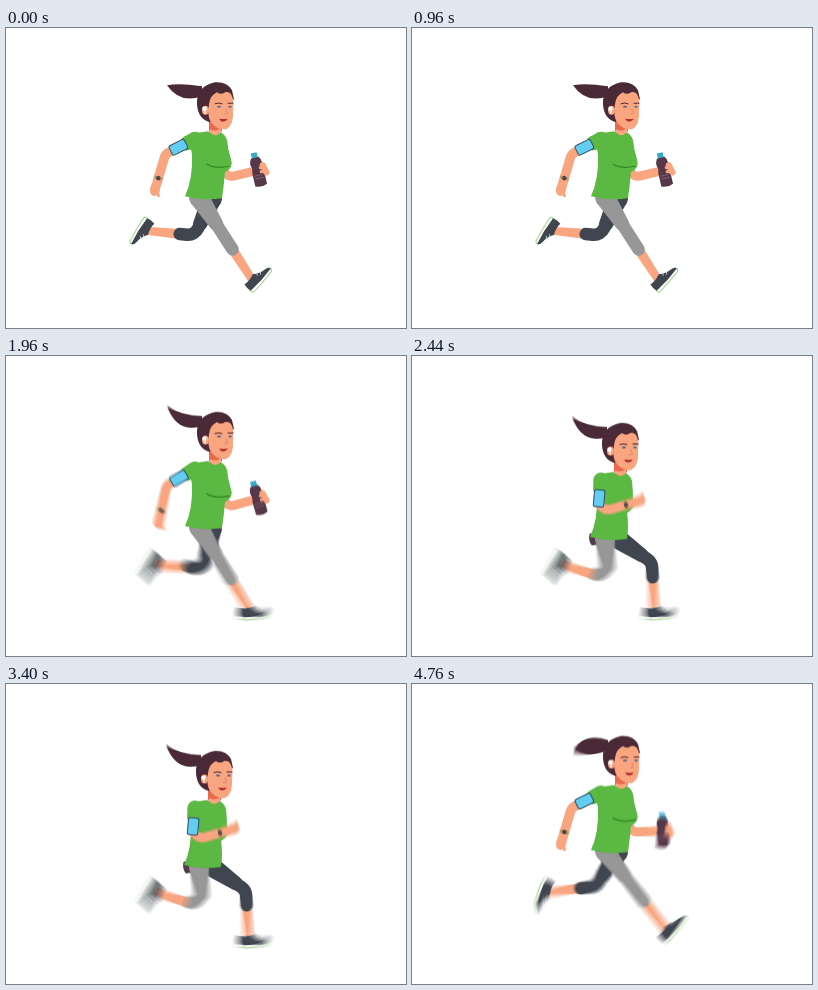
An HTML page with a canvas that plays this animation: 400x300 px, repeating every 4800 ms.

```html
<!DOCTYPE html>
<html lang="en">
<head>
<meta charset="utf-8">
<title>Runner</title>
<style>
  html, body { margin: 0; width: 100%; height: 100%; overflow: hidden; background: #fff; }
  canvas { display: block; width: 400px; height: 300px; }
</style>
</head>
<body>
<canvas id="stage" width="400" height="300"></canvas>
<script>
const STEP = 40, CYCLE = 24, SAMPLES = 12, SHUTTER = 0.9;
const THIGH = 41, SHANK = 46, RAD = Math.PI / 180;
const SKIN = '#f9a57f', HAIR = '#4b2a38', GREEN = '#5bb842', NAVY = '#3f4650';
const GREY = '#979797', PLUM = '#55384a', BLUE = '#62cdf0';

const stage = document.getElementById('stage').getContext('2d');
const layer = document.createElement('canvas');
layer.width = 400;
layer.height = 300;
const c = layer.getContext('2d');

// Both feet follow this loop half a cycle apart: step, ankle x, ankle y, foot angle.
const FOOT_PATH = [
  [0, 245, 250, -50], [1, 243, 252, -4], [7, 147, 252, 42], [10, 137, 218, 88],
  [12, 143, 203, 120], [14, 165, 218, 102], [19, 236, 232, 20], [22, 258, 239, -45]
];

// Cyclic Hermite curve through FOOT_PATH.
function footAt(phase) {
  const n = FOOT_PATH.length, t = (phase % CYCLE + CYCLE) % CYCLE;
  const key = i => {
    const turn = Math.floor(i / n), [step, ...rest] = FOOT_PATH[i - turn * n];
    return [step + turn * CYCLE, ...rest];
  };
  const i = FOOT_PATH.filter(k => k[0] <= t).length - 1;
  const [p, a, b, q] = [i - 1, i, i + 1, i + 2].map(key);
  const span = b[0] - a[0], u = (t - a[0]) / span, v = 1 - u;
  return [1, 2, 3].map(j => {
    const slopeA = (b[j] - p[j]) / (b[0] - p[0]) * span;
    const slopeB = (q[j] - a[j]) / (q[0] - a[0]) * span;
    return v * v * ((1 + 2 * u) * a[j] + u * slopeA) + u * u * ((1 + 2 * v) * b[j] - v * slopeB);
  });
}

// Cosine that peaks at the given step; two beats make one per stride.
const wave = (phase, peak, beats = 1) => Math.cos((phase - peak) * beats * 2 * Math.PI / CYCLE);
const bob = phase => 0.8 + 5.5 * wave(phase, 2, 2) + 5.5 * wave(phase, 13);

const mix = (a, b, u) => [a[0] + (b[0] - a[0]) * u, a[1] + (b[1] - a[1]) * u];
const angle = (a, b) => Math.atan2(b[1] - a[1], b[0] - a[0]);
const distance = (a, b) => Math.hypot(b[0] - a[0], b[1] - a[1]);
// Swing is measured forward from hanging straight down, in degrees.
const reach = ([x, y], length, swing) => [x + length * Math.sin(swing * RAD), y + length * Math.cos(swing * RAD)];

function fill(color, d) {
  c.fillStyle = color;
  c.fill(new Path2D(d));
}
function line(color, width, d) {
  c.strokeStyle = color;
  c.lineWidth = width;
  c.lineCap = 'round';
  c.stroke(new Path2D(d));
}
function oval(color, x, y, rx, ry = rx) {
  c.fillStyle = color;
  c.beginPath();
  c.ellipse(x, y, rx, ry, 0, 0, 2 * Math.PI);
  c.fill();
}
function at([x, y], turn, draw) {
  c.save();
  c.translate(x, y);
  c.rotate(turn);
  draw();
  c.restore();
}
function limb(color, a, b, wa, wb) {
  const length = distance(a, b);
  at(a, angle(a, b), () => {
    fill(color, `M0 ${-wa / 2}L${length} ${-wb / 2}V${wb / 2}L0 ${wa / 2}Z`);
    oval(color, 0, 0, wa / 2);
    oval(color, length, 0, wb / 2);
  });
}
function bend(color, a, joint, b, width, radius) {
  c.beginPath();
  c.moveTo(...a);
  c.arcTo(...joint, ...b, radius);
  c.lineTo(...b);
  c.strokeStyle = color;
  c.lineWidth = width;
  c.lineCap = 'round';
  c.stroke();
}

// The knee bends forward; a leg at full reach is straight.
function kneeOf(hip, ankle) {
  const d = distance(hip, ankle);
  if (d >= THIGH + SHANK) return mix(hip, ankle, THIGH / (THIGH + SHANK));
  const lift = Math.acos((THIGH ** 2 + d ** 2 - SHANK ** 2) / (2 * THIGH * d));
  const turn = angle(hip, ankle) - lift;
  return [hip[0] + THIGH * Math.cos(turn), hip[1] + THIGH * Math.sin(turn)];
}
function shoe(ankle, degrees) {
  at(ankle, degrees * RAD, () => {
    fill('#a5d68f', 'M-11 7L-10 11.5Q4 12.5 18 12Q22 11 20 7Z');
    fill('#fff', 'M-10 6L-9 10.5Q4 11.5 18 11Q20 10 19 7Z');
    fill(NAVY, 'M-9 -1Q-4 1 4 -1Q9 4 15 5Q20 6 20 9Q5 10 -10 8Q-11 4 -9 -1Z');
    line('#d5dadd', 0.8, 'M6 3L8 1M9 5L11 3');
  });
}
function leg(color, hip, [x, y, turn]) {
  const ankle = [x, y], knee = kneeOf(hip, ankle), cuff = mix(knee, ankle, 0.33);
  limb(SKIN, cuff, ankle, 10, 8);
  shoe(ankle, turn);
  limb(color, hip, mix(hip, knee, 0.7), 20, 14);
  bend(color, hip, knee, cuff, 12.5, 11);
}

function drawFarArm(phase, y) {
  const swing = wave(phase, 0.8), fold = ((1 + swing) / 2) ** 3;
  const lower = 15 + 91 * fold;
  const shoulder = [206 - 3 * swing, 118 + y];
  const elbow = reach(shoulder, 38, -2 + 32 * swing);
  const hand = reach(elbow, 29 + 5 * swing, lower);
  bend(SKIN, shoulder, elbow, hand, 9, 8);
  at(hand, (95 - 1.05 * lower) * RAD, () => {
    oval(SKIN, 1, 0, 5, 6);
    c.translate(-3, 0);
    fill('#38a9c8', 'M-3 -18H3V-12H-3Z');
    fill(PLUM, 'M-4 -13H4Q6 -10 6 -7L5 -3L6 2V15Q0 18 -6 15V2L-5 -3L-6 -7Q-6 -10 -4 -13Z');
    line('#80606f', 1, 'M-4 5H4M-4 8H4');
    limb(SKIN, [6, -4], [8, 4], 6, 6);
    line(SKIN, 3, 'M3 -2H7M3 2H7');
  });
}
function drawNearArm(phase, y) {
  const swing = wave(phase, 23.5), back = ((1 + swing) / 2) ** 2;
  const shoulder = [189, 113 + y];
  const elbow = reach(shoulder, 33, -5 - 59 * back);
  const hand = reach(elbow, 40 - 3 * swing, 47 - 64 * swing);
  bend(SKIN, shoulder, elbow, hand, 9.5, 9);
  limb(GREEN, shoulder, mix(shoulder, elbow, 0.28), 15, 14);
  at(mix(shoulder, elbow, 0.56), angle(shoulder, elbow), () => {
    c.beginPath();
    c.roundRect(-8.5, -5, 17, 10.5, 2);
    c.fillStyle = BLUE;
    c.fill();
    c.strokeStyle = '#345064';
    c.lineWidth = 1;
    c.stroke();
  });
  at(mix(elbow, hand, 0.68), angle(elbow, hand), () => {
    fill('#c99a55', 'M-1.5 -4.5H1.5V4.5H-1.5Z');
    oval('#4a4550', 0, 0, 2.3);
  });
  at(hand, angle(elbow, hand), () => {
    oval(SKIN, 0, 0, 6.5, 5);
    line(SKIN, 3, 'M0 -2L5 -5');
  });
}

function drawTorso(twist) {
  const bust = 227 - 3 * twist;
  fill(GREEN, `M187 108Q195 106 203 105Q208 109 213 105Q220 107 222 114Q223 124 ${bust - 1} 133
    Q${bust + 2} 141 ${bust - 7} 146Q219 158 217 172Q199 175 180 170Q188 153 187 128L184 113Z`);
  c.globalAlpha = 1 - twist;
  line('#37882b', 1.2, 'M202 138Q211 143 224 140');
  c.globalAlpha = 1;
}
function drawHead(phase) {
  const flick = wave(phase, 2, 2), tip = `162 ${71.5 - 25 * flick}`;
  fill(HAIR, `M${tip}Q${172 + 5 * flick} ${52 + 9 * flick} 197 60V70Q${179 - 8 * flick} 78 ${tip}Z`);
  fill('#e9694c', 'M204 92H217V105Q211 110 204 105Z');
  fill(SKIN, 'M205 103Q211 106 216 102V106Q210 112 205 106Z');
  fill(HAIR, 'M210 56Q222 55 227 64L229 73L214 78L205 96Q193 93 192 78Q191 60 210 56Z');
  fill(SKIN, 'M204 78Q205 69 212 66Q216 69 220 66Q225 65 227 70Q229 74 228 84Q229 99 221 103Q212 104 206 96Q202 90 204 78Z');
  oval(SKIN, 200.5, 84, 3.5, 4.5);
  oval('#fff', 199.5, 82.5, 2.2);
  line('#fff', 1.2, 'M200 83V87');
  line(HAIR, 1, 'M210 77.5Q214 76 217 77.5M223 77L228 77');
  oval('#536e91', 214, 80.5, 2, 1.1);
  oval('#536e91', 225, 80.5, 1.7, 1.1);
  line('#e98b68', 1, 'M221 83L222.5 87L219.5 88');
  fill('#b72f35', 'M214 92.5Q218 93 223 92.5Q221 95.5 218 95.5Q215 95 214 92.5Z');
}

function drawRunner(phase) {
  const y = bob(phase), twist = ((1 - wave(phase, 1)) / 2) ** 2;
  c.fillStyle = '#fff';
  c.fillRect(0, 0, 400, 300);
  drawFarArm(phase, y);
  leg(NAVY, [206, 172 + y], footAt(phase + CYCLE / 2));
  leg(GREY, [193, 171 + y], footAt(phase));
  at([-1 - twist, y], 0, () => {
    drawTorso(twist);
    drawHead(phase);
  });
  drawNearArm(phase, y);
}

// Averages several moments of one step into motion blur; each cycle opens crisp.
function render(step) {
  const count = step === 0 ? 1 : SAMPLES;
  for (let i = 0; i < count; i++) {
    drawRunner(step + ((i + 0.5) / count - 0.5) * SHUTTER);
    stage.globalAlpha = 1 / (i + 1);
    stage.drawImage(layer, 0, 0);
  }
}

const start = performance.now();
function tick() {
  render(Math.floor((performance.now() - start) / STEP) % CYCLE);
  requestAnimationFrame(tick);
}
tick();
</script>
</body>
</html>
```
